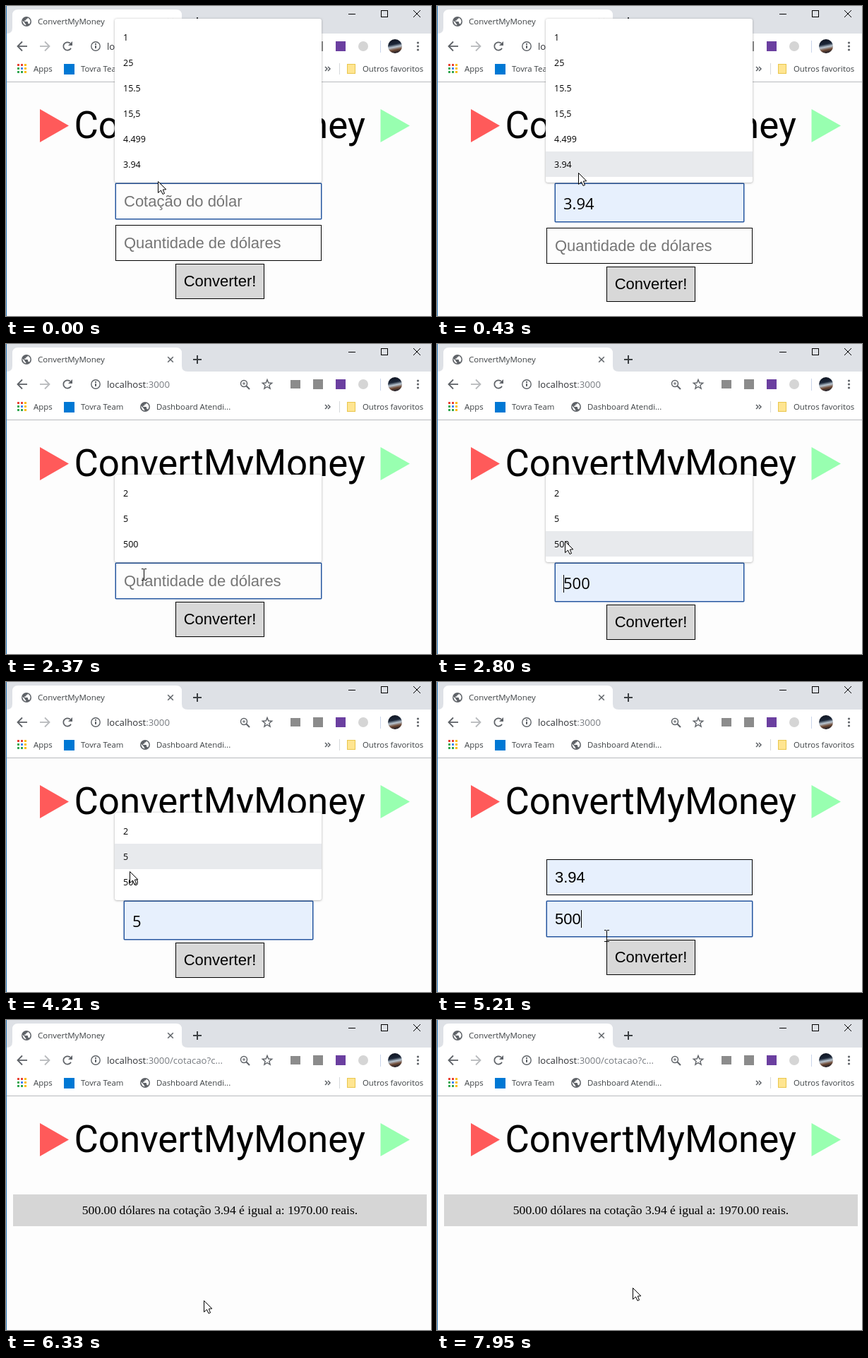
These frames come from a looping animation (602 by 439 pixels, 8000 ms). An HTML page with a canvas:

```html
<!DOCTYPE html>
<html lang="pt-BR">
<head>
<meta charset="utf-8">
<title>ConvertMyMoney</title>
<style>
html, body { margin: 0; width: 100%; height: 100%; overflow: hidden; background: #fdfdfd; }
canvas { display: block; }
</style>
</head>
<body>
<canvas id="stage" width="602" height="439"></canvas>
<script>
const ctx = document.getElementById('stage').getContext('2d');
const LOOP = 8000;
const UI = '"Open Sans", "Noto Sans", sans-serif';
const FORM = '22px "Liberation Sans", Arial, sans-serif';
const ICON = '#5f6368';
const FOCUS = '#24559f';

// Pointer moves: start, end, steps, target x, target y
const moves = [
  [150, 580, 4, 185, 224],
  [1140, 1820, 6, 196, 332],
  [2230, 2370, 2, 195, 327],
  [2490, 3100, 5, 172, 247],
  [3380, 3380, 1, 172, 246],
  [4070, 4210, 2, 175, 268],
  [4360, 4500, 2, 179, 284],
  [4800, 5090, 3, 225, 325],
  [5210, 5210, 1, 240, 360],
  [5340, 5750, 4, 280, 397],
  [7700, 7950, 3, 277, 379]
];
const caretTimes = [[880, 1410], [1820, 2230], [2790, 3510], [4650, 5340], [5750, 6030]];
const lists = [
  { from: 0, to: 880, top: 18, bottom: 250, rows: 26, items: ['1', '25', '15.5', '15,5', '4.499', '3.94'] },
  { from: 1820, to: 4650, top: 185, bottom: 309, rows: 193, items: ['2', '5', '500'] }
];
const within = (t, [a, b]) => t >= a && t < b;

function pointerAt(t) {
  let x = 215, y = 248;
  for (const [start, end, steps, tx, ty] of moves) {
    if (t < start) break;
    const gap = (end - start) / (steps - 1 || 1) || 1;
    const k = Math.min(steps, 1 + Math.floor((t - start) / gap)) / steps;
    x += (tx - x) * k;
    y += (ty - y) * k;
  }
  return { x: Math.round(x), y: Math.round(y) };
}

function rect(x, y, w, h, color) {
  ctx.fillStyle = color;
  ctx.fillRect(x, y, w, h);
}

function box(x, y, w, h, fill, stroke) {
  rect(x, y, w, h, fill);
  ctx.strokeStyle = stroke;
  ctx.lineWidth = 1;
  ctx.strokeRect(x + .5, y + .5, w - 1, h - 1);
}

function text(str, x, y, font, color = '#000', align = 'left') {
  ctx.font = font;
  ctx.fillStyle = color;
  ctx.textAlign = align;
  ctx.fillText(str, x, y);
  return ctx.measureText(str).width;
}

function line(points, color, width = 1) {
  ctx.beginPath();
  points.forEach(([x, y]) => ctx.lineTo(x, y));
  ctx.strokeStyle = color;
  ctx.lineWidth = width;
  ctx.stroke();
}

function shape(points, fill, stroke) {
  ctx.beginPath();
  points.forEach(([x, y]) => ctx.lineTo(x, y));
  ctx.closePath();
  if (fill) { ctx.fillStyle = fill; ctx.fill(); }
  if (stroke) { ctx.strokeStyle = stroke; ctx.stroke(); }
}

function disc(x, y, r, fill) {
  ctx.beginPath();
  ctx.arc(x, y, r, 0, 7);
  ctx.fillStyle = fill;
  ctx.fill();
}

function arc(x, y, r, a, b, color, width) {
  ctx.beginPath();
  ctx.arc(x, y, r, a, b);
  ctx.strokeStyle = color;
  ctx.lineWidth = width;
  ctx.stroke();
}

function cross(x, y, r, color, width) {
  line([[x - r, y - r], [x + r, y + r]], color, width);
  line([[x + r, y - r], [x - r, y + r]], color, width);
}

function globe(x, y) {
  ctx.save();
  ctx.translate(x, y);
  ctx.scale(.7, .7);
  disc(0, 0, 10, ICON);
  shape([[-1, 7.9], [-5.5, 5.8], [-8, 0], [-7.8, -1.8], [-3, 3], [-3, 4], [-1, 6]], '#fff');
  shape([[5.9, 5.4], [4, 4], [3, 4], [3, 1], [2, 0], [-4, 0], [-4, -2], [-2, -2],
    [-1, -3], [-1, -5], [1, -5], [3, -7.4], [6.5, -4.7], [8, 0]], '#fff');
  ctx.restore();
}

function arrowIcon(x, dir, color) {
  line([[x - 6 * dir, 57], [x + 7 * dir, 57]], color, 1.8);
  line([[x, 50.5], [x - 6.5 * dir, 57], [x, 63.5]], color, 1.8);
}

function tabStrip(loading) {
  rect(0, 0, 602, 39, '#dee1e6');
  ctx.beginPath();
  ctx.moveTo(1, 39);
  ctx.quadraticCurveTo(9, 39, 9, 31);
  ctx.lineTo(9, 13);
  ctx.quadraticCurveTo(9, 5, 17, 5);
  ctx.lineTo(241, 5);
  ctx.quadraticCurveTo(249, 5, 249, 13);
  ctx.lineTo(249, 31);
  ctx.quadraticCurveTo(249, 39, 257, 39);
  ctx.fillStyle = '#fff';
  ctx.fill();
  if (loading) arc(29, 22, 6, -2, 2.2, '#80868b', 2);
  else globe(29, 22);
  text('ConvertMyMoney', 45, 26, '11.5px ' + UI, '#3c4043');
  cross(233, 22, 3.8, ICON, 1.5);
  line([[265, 22], [277, 22]], '#3c4043', 2);
  line([[271, 16], [271, 28]], '#3c4043', 2);
  rect(485, 11, 10, 1, '#000');
  ctx.strokeStyle = '#000';
  ctx.lineWidth = 1;
  ctx.strokeRect(531.5, 6.5, 9, 9);
  cross(582, 11, 5, '#000', 1);
}

function toolbar(path) {
  rect(0, 39, 602, 68, '#fff');
  arrowIcon(23, 1, ICON);
  arrowIcon(55, -1, '#b8babd');
  arc(87, 57, 5.7, .5, 5.5, ICON, 1.8);
  shape([[94, 50], [94, 56], [88, 56]], ICON);
  arc(127, 57, 6.2, 0, 7, ICON, 1.4);
  rect(126, 56, 2, 4, ICON);
  rect(126, 53, 2, 2, ICON);
  const hostWidth = text('localhost', 143, 62, '13.2px ' + UI, '#303236');
  text(':3000' + path, 143 + hostWidth, 62, '13.2px ' + UI, '#777b80');

  arc(337, 56, 4.5, 0, 7, ICON, 1.5);
  line([[340, 59], [345, 64]], ICON, 2);
  line([[335, 56], [339, 56]], ICON);
  line([[337, 54], [337, 58]], ICON);
  ctx.lineWidth = 1.4;
  shape(Array.from({ length: 10 }, (_, i) => {
    const a = i * Math.PI / 5 - Math.PI / 2, r = i % 2 ? 3 : 7;
    return [370 + r * Math.cos(a), 57.5 + r * Math.sin(a)];
  }), null, ICON);

  rect(403, 51, 14, 12, '#8c8c8c');
  rect(435, 50, 14, 14, '#8b8b8b');
  rect(467, 50, 14, 14, '#6b3fa0');
  disc(506, 57, 7, '#d5d5d5');
  rect(530, 49, 1, 17, '#c9d5ea');
  const photo = ctx.createLinearGradient(549, 47, 553, 67);
  photo.addColorStop(0, '#101522');
  photo.addColorStop(.35, '#1b2638');
  photo.addColorStop(.55, '#b9c6d2');
  photo.addColorStop(.75, '#6f4a35');
  photo.addColorStop(1, '#111522');
  disc(551, 57, 10, photo);
  for (const y of [52, 57, 62]) disc(583.5, y, 1.6, ICON);
}

function bookmarks() {
  const colors = ['#ea4335', '#ea4335', '#fbbc05', '#34a853', '#4285f4', '#fbbc05', '#34a853', '#34a853', '#fbbc05'];
  colors.forEach((c, i) => rect(16 + i % 3 * 5, 82 + Math.floor(i / 3) * 5, 3, 3, c));
  const label = (str, x) => text(str, x, 93, '11.4px ' + UI, '#3c4043');
  label('Apps', 39);
  rect(82, 82, 15, 15, '#0078d4');
  label('Tovra Team', 106);
  globe(197, 89);
  label('Dashboard Atendi...', 213);
  for (const x of [452, 456]) line([[x, 86], [x + 3, 89], [x, 92]], ICON, 1.5);
  rect(472, 81, 1, 16, '#d5d8dc');
  box(483, 82, 12, 14, '#ffe591', '#e9c64d');
  label('Outros favoritos', 505);
  rect(0, 107, 602, 1, '#b9bbbe');
}

function field(y, value, placeholder, focused, preview, caret) {
  const [x, w, h] = preview ? [167, 268, 55] : [155, 292, 51];
  box(x, y, w, h, value ? '#e7f0fd' : '#fdfdfd', focused ? FOCUS : '#000');
  if (focused) {
    ctx.beginPath();
    ctx.roundRect(x - .3, y - .3, w + .6, h + .6, 1.5);
    ctx.strokeStyle = FOCUS + '99';
    ctx.stroke();
  }
  const base = y + (preview ? 37 : 33);
  const font = preview ? '22px ' + UI : FORM;
  const width = text(value || placeholder, x + 12, base, font, value ? '#000' : '#757575');
  if (caret) rect(x + 12 + (value && !preview ? Math.round(width) : 0), base - 20, 1, 25, '#000');
}

function dropdown(list, hover) {
  ctx.save();
  ctx.shadowColor = 'rgba(0,0,0,.35)';
  ctx.shadowBlur = 3;
  ctx.shadowOffsetY = .5;
  ctx.beginPath();
  ctx.roundRect(154, list.top, 293, list.bottom - list.top, 3);
  ctx.fillStyle = '#fff';
  ctx.fill();
  ctx.restore();
  list.items.forEach((item, i) => {
    const y = list.rows + i * 36;
    if (i === hover) rect(154, y, 293, 36, '#e8eaed');
    text(item, 166, y + 23, '500 12.5px ' + UI);
  });
}

function pointer({ x, y }, beam) {
  if (beam) {
    rect(x, y - 8, 1, 15, '#000');
    for (const edge of [y - 9, y + 7]) {
      rect(x - 3, edge, 3, 1, '#000');
      rect(x + 1, edge, 3, 1, '#000');
    }
    return;
  }
  ctx.lineWidth = 1;
  const outline = [[0, 0], [0, 16], [4, 12.5], [6.5, 18], [9, 17], [6.8, 11.6], [11.3, 11.3]];
  shape(outline.map(([dx, dy]) => [x + .5 + dx, y + .5 + dy]), '#fff', '#000');
}

function form(t, active, preview, caret) {
  const shift = preview ? 4 : 0;
  const focus = t < 1820 ? 0 : t < 6030 ? 1 : -1;
  const first = t < 880 ? preview : '3.94';
  const second = t < 4650 ? (t < 1820 ? '' : preview) : '500';
  const firstPreview = active === 0 && !!preview;
  field(251, first, 'Cotação do dólar', focus === 0, firstPreview, caret && focus === 0);
  field(310 + (firstPreview ? 4 : 0), second, 'Quantidade de dólares', focus === 1,
    active === 1 && !!preview, caret && focus === 1);
  box(240, 365 + shift, 126, 50, '#d8d8d8', focus < 0 ? FOCUS : '#000');
  text('Converter!', 303, 397 + shift, FORM, '#000', 'center');
}

function draw(t) {
  const done = t >= 6180;
  const pos = pointerAt(t);
  const active = lists.findIndex(l => within(t, [l.from, l.to]));
  const list = lists[active];
  const hover = list ? Math.floor((pos.y - 4 - list.rows) / 36) : -1;
  const preview = list && list.items[hover] || '';
  const caret = caretTimes.some(span => within(t, span));

  rect(0, 0, 602, 439, '#fdfdfd');
  tabStrip(within(t, [6030, 6330]));
  toolbar(done ? '/cotacao?c...' : '');
  bookmarks();
  rect(0, 0, 1, 439, '#2a78b8');

  shape([[48, 146], [89, 169.5], [48, 193]], '#ff5a5a');
  shape([[530.5, 146], [572, 169.5], [530.5, 193]], '#98ffb0');
  text('ConvertMyMoney', 96.5, 187, '52.8px Roboto, sans-serif');

  if (done) {
    rect(10, 247, 586, 45, '#d6d6d6');
    text('500.00 dólares na cotação 3.94 é igual a: 1970.00 reais.', 303, 275,
      '17.6px "Liberation Serif", "Times New Roman", serif', '#000', 'center');
  } else {
    form(t, active, preview, caret);
    if (list) dropdown(list, hover);
  }
  const overField = pos.x > 155 && pos.x < 447 &&
    (within(pos.y, [251, 302]) || within(pos.y, [310, 361]));
  const overList = list && pos.y < list.bottom;
  pointer(pos, !done && overField && !overList);
}

function tick() {
  draw(performance.now() % LOOP);
  requestAnimationFrame(tick);
}
tick();
</script>
</body>
</html>
```
